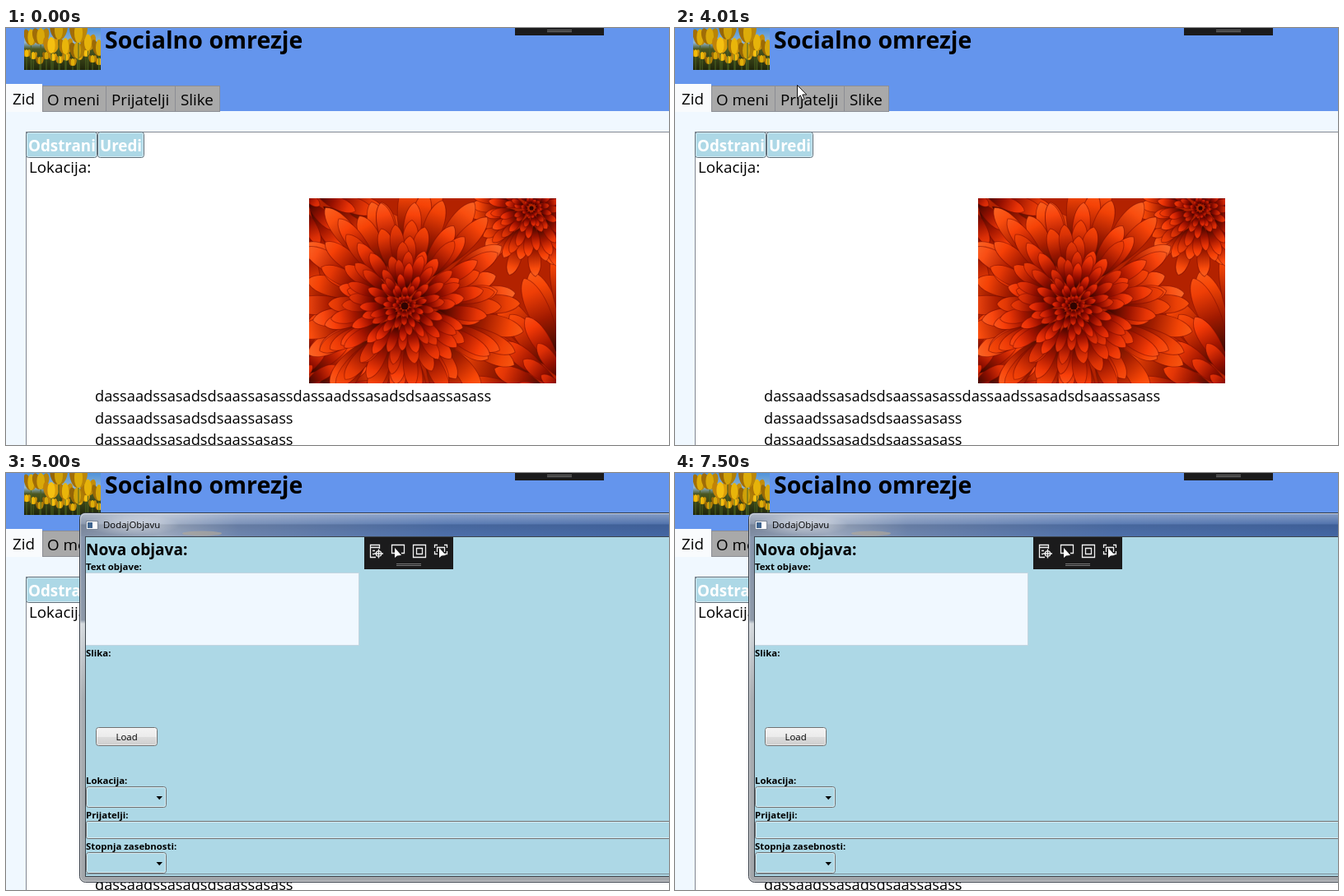
An HTML page with a canvas that plays this animation: 805 by 507 pixels, repeating every 8000 ms.

```html
<!DOCTYPE html>
<html lang="sl">
<head>
<meta charset="utf-8">
<title>Socialno omrezje</title>
<style>
html, body { margin: 0; width: 100%; height: 100%; overflow: hidden; }
#stage { position: relative; width: 805px; height: 507px; overflow: hidden; background: #f0f8ff; }
#stage > * { position: absolute; left: 0; top: 0; }
svg { display: block; overflow: hidden; }
text { font-family: "Open Sans", "Noto Sans", sans-serif; font-size: 18.8px; white-space: pre; }
.b { font-weight: 700; }
.w { fill: #fff; }
.post { font-size: 18.25px; }
.s { font-size: 11.4px; }
.line { fill: none; stroke: #707070; }
.shine { fill: none; stroke: #fff; stroke-opacity: .5; }
.btn { fill: #add8e6; stroke: #61707a; }
.tab { fill: #a9a9a9; stroke: #8c8e94; }
.icon { fill: none; stroke: #f2f2f2; stroke-width: 1.3; }
.face { fill: none; stroke: #34454e; stroke-width: 2; stroke-linecap: round; }
.solid { fill: #34454e; }
#stage > #tulips { left: 22px; }
#stage > #bloom { left: 368px; top: 207px; }

#hover { animation: hover 8s step-end infinite; }
@keyframes hover {
  0% { opacity: 0; }
  22% { opacity: .7; }
  26%, 100% { opacity: 0; }
}

#dialog { transform-origin: 460px 273px; animation: open 8s step-end infinite; }
@keyframes open {
  0% { opacity: 0; transform: none; }
  51% { opacity: .25; transform: translateY(-4px) perspective(1000px) rotateX(-6deg) scale(.925); }
  52% { opacity: .61; transform: translateY(-2.5px) perspective(1000px) rotateX(-3.7deg) scale(.954); }
  52.625% { opacity: .85; transform: translateY(-1px) perspective(1000px) rotateX(-1.5deg) scale(.982); }
  53.375% { opacity: .96; transform: perspective(1000px) rotateX(-.4deg) scale(.996); }
  54.25%, 100% { opacity: 1; transform: none; }
}

#tools { animation: tools 8s step-end infinite; }
@keyframes tools {
  0% { opacity: 0; }
  55.125%, 100% { opacity: 1; }
}

#form { animation: scroll 8s infinite; }
@keyframes scroll {
  0% { transform: translateY(0); animation-timing-function: step-end; }
  76.875% { transform: translateY(0); animation-timing-function: steps(8, start); }
  83.7375% { transform: translateY(-74px); animation-timing-function: step-end; }
  86.25% { transform: translateY(-74px); animation-timing-function: steps(10, start); }
  94.5875%, 100% { transform: translateY(0); }
}

#cursor { animation: move 8s step-end infinite, show 8s step-end infinite; }
@keyframes show {
  0% { opacity: 0; }
  8.875% { opacity: 1; }
  62.5%, 100% { opacity: 0; }
}
@keyframes move {
  0% { transform: translate(478px, 531px); }
  8.875% { transform: translate(478px, 531px); animation-timing-function: steps(4, start); }
  11.7125% { transform: translate(151px, 379px); }
  14.375% { transform: translate(151px, 379px); animation-timing-function: steps(11, start); }
  23.725% { transform: translate(78px, 3px); }
  26% { transform: translate(78px, 3px); animation-timing-function: steps(5, start); }
  30.375% { transform: translate(361px, -5px); }
  33.625% { transform: translate(300px, 110px); }
  34.75% { transform: translate(207px, 215px); }
  35.875% { transform: translate(114px, 170px); }
  37% { transform: translate(200px, 120px); }
  38.125% { transform: translate(280px, 74px); }
  40% { transform: translate(220px, 50px); }
  40.875% { transform: translate(118px, 13px); }
  41.75% { transform: translate(125px, 40px); }
  42.625% { transform: translate(136px, 57px); }
  48.25% { transform: translate(148px, 62px); }
  50.125% { transform: translate(148px, 69px); }
  57% { transform: translate(148px, 69px); animation-timing-function: steps(7, start); }
  62.5125%, 100% { transform: translate(782px, 348px); }
}
</style>
</head>
<body>
<div id="stage">
  <svg width="805" height="507">
    <rect width="805" height="101" fill="#6495ed"/>
    <text class="b" x="120" y="25" style="font-size:28.5px">Socialno omrezje</text>
    <g id="hover" class="shine"><path d="M0 64.5H113.5V52M0 61.5H110.5V52"/></g>
    <g class="tab">
      <rect x="44.5" y="70.5" width="77" height="31"/>
      <rect x="121.5" y="70.5" width="84" height="31"/>
      <rect x="205.5" y="70.5" width="54" height="31"/>
    </g>
    <rect y="68" width="44" height="34" fill="#f9fbfd"/>
    <text x="8" y="93">Zid</text>
    <text x="50" y="94">O meni</text>
    <text x="128" y="94">Prijatelji</text>
    <text x="212" y="94">Slike</text>

    <rect x="24.5" y="126.5" width="800" height="400" fill="#fff" stroke="#828790"/>
    <rect class="btn" x="24.5" y="126.5" width="86" height="31" rx="3"/>
    <rect class="btn" x="111.5" y="126.5" width="56" height="31" rx="3"/>
    <rect class="shine" x="25.5" y="127.5" width="84" height="29" rx="2"/>
    <rect class="shine" x="112.5" y="127.5" width="54" height="29" rx="2"/>
    <text class="b w" x="27" y="150">Odstrani</text>
    <text class="b w" x="114" y="150">Uredi</text>
    <text x="28" y="176">Lokacija:</text>
    <text class="post" x="108" y="454">dassaadssasadsdsaassasassdassaadssasadsdsaassasass</text>
    <text class="post" x="108" y="481">dassaadssasadsdsaassasass</text>
    <text class="post" x="108" y="507">dassaadssasadsdsaassasass</text>

    <rect x="618" width="108" height="9" fill="#1b1b1c"/>
    <path d="M657 2.5H687M657 4.5H687" stroke="#777"/>
  </svg>
  <canvas id="tulips" width="93" height="51"></canvas>
  <canvas id="bloom" width="300" height="225"></canvas>

  <div id="dialog">
    <svg width="840" height="507">
      <defs>
        <linearGradient id="bar">
          <stop offset="0" stop-color="#8391a8"/>
          <stop offset=".13" stop-color="#a3b0c5"/>
          <stop offset=".26" stop-color="#7189b3"/>
          <stop offset=".6" stop-color="#4f72ae"/>
          <stop offset="1" stop-color="#4468a6"/>
        </linearGradient>
        <linearGradient id="gloss" x2="0" y2="1">
          <stop offset="0" stop-color="#fff" stop-opacity=".35"/>
          <stop offset=".45" stop-color="#fff" stop-opacity=".08"/>
          <stop offset=".5" stop-color="#000" stop-opacity=".1"/>
          <stop offset="1" stop-color="#000" stop-opacity=".02"/>
        </linearGradient>
        <linearGradient id="side" x2="0" y2="1">
          <stop offset="0" stop-color="#8393ad"/>
          <stop offset=".29" stop-color="#8d99a8"/>
          <stop offset=".3" stop-color="#d5dade"/>
          <stop offset=".5" stop-color="#a9aeb3"/>
          <stop offset="1" stop-color="#a2a6aa"/>
        </linearGradient>
        <linearGradient id="silver" x2="0" y2="1">
          <stop offset="0" stop-color="#f3f3f3"/>
          <stop offset=".5" stop-color="#ebebeb"/>
          <stop offset=".5" stop-color="#dddddd"/>
          <stop offset="1" stop-color="#cdcdcd"/>
        </linearGradient>
        <radialGradient id="glow">
          <stop offset="0" stop-color="#fff" stop-opacity=".5"/>
          <stop offset="1" stop-color="#fff" stop-opacity="0"/>
        </radialGradient>
        <clipPath id="view"><rect x="97" y="78" width="730" height="412"/></clipPath>
      </defs>

      <rect x="89.5" y="48.5" width="741" height="449" rx="7" fill="url(#side)" stroke="#343b45"/>
      <path d="M90 77V55Q90 49 96 49H830V77Z" fill="url(#bar)"/>
      <path d="M90 77V55Q90 49 96 49H830V77Z" fill="url(#gloss)"/>
      <rect class="shine" x="90.5" y="49.5" width="739" height="447" rx="6"/>
      <ellipse cx="238" cy="73.5" rx="24" ry="3" fill="#b5aa98" opacity=".6"/>
      <ellipse cx="153" cy="63" rx="58" ry="13" fill="url(#glow)"/>
      <rect x="97.5" y="58.5" width="14" height="10" fill="#fff" stroke="#7b8798"/>
      <rect x="99" y="60" width="6" height="7" fill="#3f648f"/>
      <text class="s" x="118" y="67">DodajObjavu</text>
      <rect x="96.5" y="77.5" width="731" height="413" fill="#add8e6" stroke="#3d454c"/>

      <g clip-path="url(#view)">
        <g id="form">
          <text class="b" x="97" y="100" style="font-size:19.1px">Nova objava:</text>
          <text class="b s" x="97" y="118">Text objave:</text>
          <rect x="96.5" y="121.5" width="332" height="88" fill="#f0f8ff" stroke="#c3d5e0"/>
          <text class="b s" x="97" y="223">Slika:</text>
          <rect x="109.5" y="309.5" width="74" height="22" rx="3" fill="url(#silver)" stroke="#707070"/>
          <rect class="shine" x="110.5" y="310.5" width="72" height="20" rx="2"/>
          <text class="s" x="133.5" y="325">Load</text>
          <text class="b s" x="97" y="378">Lokacija:</text>
          <g id="combo">
            <rect class="line" x="97.5" y="381.5" width="97" height="25" rx="3"/>
            <rect class="shine" x="98.5" y="382.5" width="95" height="23" rx="2"/>
            <path d="M182.5 393H190L186.2 397.3Z"/>
          </g>
          <text class="b s" x="97" y="420">Prijatelji:</text>
          <rect class="line" x="97.5" y="423.5" width="740" height="21" rx="2"/>
          <rect class="shine" x="98.5" y="424.5" width="738" height="19" rx="1"/>
          <text class="b s" x="97" y="458">Stopnja zasebnosti:</text>
          <use href="#combo" y="80"/>
          <rect x="96.5" y="487.5" width="740" height="45" fill="none" stroke="#7d8e98"/>
          <g class="face" transform="translate(122 510)">
            <circle r="14"/>
            <path d="M-8-3Q-5.5-6-3-3M3-3Q5.5-6 8-3M-8 3Q0 11 8 3"/>
          </g>
          <g class="face" transform="translate(167 510)">
            <circle r="14"/><circle class="solid" cx="-5" cy="-4" r="1"/>
            <path d="M3-5L8-3L3-2"/><path class="solid" d="M-7 2H7Q5 9 0 9T-7 2Z"/>
          </g>
          <g class="face" transform="translate(211.5 510)">
            <circle r="14"/><circle class="solid" cx="-5" cy="-2" r="1"/><circle class="solid" cx="5" cy="-2" r="1"/>
            <path d="M-8-6L-3-4M8-6L3-4M-6 7Q0 1 6 7"/>
          </g>
          <g class="face" transform="translate(256 510)">
            <circle r="14"/>
            <path d="M-9-3Q-6 0-3-3M3-3Q6 0 9-3"/><path class="solid" d="M-6 8Q-5 3 0 3T6 8Q0 5-6 8Z"/>
          </g>
          <g class="face" transform="translate(301 510)">
            <circle r="14"/>
            <path d="M-7-5L-4-2M-4-5L-7-2M4-5L7-2M7-5L4-2"/><path class="solid" d="M-6 8Q-5 3 0 3T6 8Q0 5-6 8Z"/>
          </g>
          <rect class="btn" x="97.5" y="533.5" width="52" height="30" rx="3" style="stroke:#2c9fc4"/>
          <rect x="98.5" y="534.5" width="50" height="28" rx="2" fill="none" stroke="#3fc8ee"/>
          <rect class="btn" x="150.5" y="533.5" width="74" height="30" rx="3"/>
          <rect class="shine" x="151.5" y="534.5" width="72" height="28" rx="2"/>
          <text class="b w" x="104" y="557" style="font-size:19.7px">Add</text>
          <text class="b w" x="156.5" y="557">Cancel</text>
        </g>
      </g>

      <g id="tools">
        <rect x="435" y="78" width="108" height="39" fill="#1b1b1c"/>
        <g class="icon">
          <path d="M449 102.5H442.5V87.5H453.5V92M442 90.5H454M445 94.5H448M445 98.5H447"/>
          <circle cx="452.5" cy="98" r="3.2"/><path d="M452.5 92.5V103.5M447 98H458"/>
          <path d="M472 97.5H468.5V87.5H483.5V97.5H480"/>
          <path d="M494.5 87.5H509.5V102.5H494.5ZM498.5 91.5H505.5V98.5H498.5Z"/>
          <path d="M520.5 91V87.5H524M532 87.5H535.5V91M520.5 95V98.5H524M532 98.5H535.5V95M523.5 96V90.5H532.5V96"/>
        </g>
        <path id="arrow" class="w" d="M472 91V103L475 100.5L480 100Z"/>
        <use href="#arrow" x="54"/>
        <path d="M474 110.5H504M474 112.5H504" stroke="#777"/>
      </g>
    </svg>
  </div>

  <svg id="cursor" width="13" height="20">
    <path d="M.5 .5V16.5L4.3 12.9L6.8 18.5L9.2 17.5L6.8 12H11.8Z" fill="#fff" stroke="#111"/>
  </svg>
</div>
<script>
let seed = 7;
const rnd = () => (seed = seed * 16807 % 2147483647) / 2147483647;
const context = id => document.getElementById(id).getContext('2d');

// One tapered petal pointing away from (x, y)
function petal(c, x, y, angle, from, to, width, hue, light) {
  const len = to - from;
  const shade = c.createLinearGradient(from, 0, to, 0);
  shade.addColorStop(0, `hsl(${hue - 6} 100% ${light * .2}%)`);
  shade.addColorStop(.45, `hsl(${hue - 5} 100% ${light * .65}%)`);
  shade.addColorStop(.8, `hsl(${hue} 95% ${light}%)`);
  shade.addColorStop(1, `hsl(${hue + 2} 95% ${light + 4}%)`);
  c.save();
  c.translate(x, y);
  c.rotate(angle);
  c.beginPath();
  c.moveTo(from, 0);
  c.bezierCurveTo(from + len * .35, -width, to - len * .12, -width, to, 0);
  c.bezierCurveTo(to - len * .12, width, from + len * .35, width, from, 0);
  c.fillStyle = shade;
  c.fill();
  c.strokeStyle = 'rgba(120, 10, 0, .5)';
  c.stroke();
  c.restore();
}

function flower(c, x, y, size, rings) {
  for (let k = 0; k < rings; k++) {
    const f = 1 - k / rings;
    const count = 14 + Math.round(f * 4);
    for (let i = 0; i < count; i++) {
      const angle = (i + k * .47 + rnd() * .7) / count * Math.PI * 2;
      const to = size * f * (.85 + rnd() * .25);
      petal(c, x, y, angle, to * .4, to, 2 + 15 * f * size / 150, 7 + 9 * f, 36 + 12 * f + rnd() * 6);
    }
  }
  c.fillStyle = '#300300';
  c.beginPath();
  c.arc(x, y, size * .03, 0, 7);
  c.fill();
}

const bloom = context('bloom');
bloom.fillStyle = '#b32200';
bloom.fillRect(0, 0, 300, 225);
flower(bloom, -25, -20, 165, 6);
flower(bloom, -30, 240, 150, 6);
flower(bloom, 330, 250, 190, 6);
flower(bloom, 270, 12, 85, 7);
flower(bloom, 116, 131, 150, 11);

const tulips = context('tulips');
const sky = tulips.createLinearGradient(0, 0, 0, 51);
sky.addColorStop(0, '#4f93dd');
sky.addColorStop(.35, '#8fb4cf');
sky.addColorStop(.5, '#4c5720');
sky.addColorStop(1, '#1f260b');
tulips.fillStyle = sky;
tulips.fillRect(0, 0, 93, 51);

function tulip(x, y, w, h) {
  tulips.strokeStyle = '#4c6423';
  tulips.beginPath();
  tulips.moveTo(x, y + h / 2);
  tulips.lineTo(x, 51);
  tulips.stroke();
  const light = 42 + rnd() * 10;
  for (const [dx, dim] of [[-.28, 12], [.28, 7], [0, 0]]) {
    tulips.fillStyle = `hsl(${46 - dim / 2} 92% ${light - dim}%)`;
    tulips.beginPath();
    tulips.ellipse(x + dx * w, y, w * .28, h / 2, dx, 0, 7);
    tulips.fill();
  }
}
for (let i = 0; i < 12; i++) tulip(3 + i * 8, 29 + rnd() * 14, 8, 9);
for (let i = 0; i < 7; i++) tulip(5 + i * 14 + rnd() * 4, 10 + rnd() * 18, 14 + rnd() * 4, 20);
tulip(42, 3, 18, 22);
tulip(66, 6, 18, 24);
</script>
</body>
</html>
```
